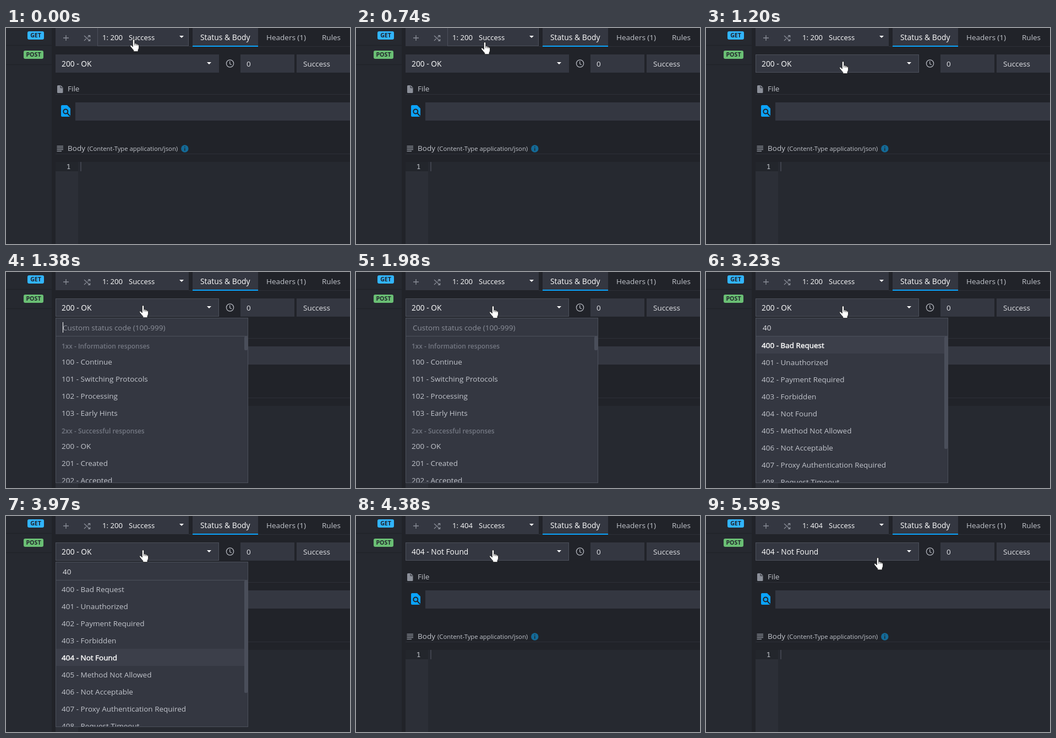
Animation of 625x392 px, one loop 6490 ms. Source, as an HTML page:

```html
<!DOCTYPE html>
<html lang="en">
<head>
<meta charset="utf-8">
<title>Status code picker</title>
<style>
  html, body { margin: 0; width: 100%; height: 100%; overflow: hidden; background: #212329; }
  svg { display: block; width: 100%; height: 100%; }
  text { font: 13.5px "Open Sans", "Noto Sans", sans-serif; fill: #c2c5cc; white-space: pre; }
  .bright { fill: #fff; }
  .value { fill: #e2e3e7; }
  .small { font-size: 11.3px; }
  .badge { font-size: 10.6px; font-weight: 700; fill: #20242b; text-anchor: middle; }
  .group { font-size: 11.9px; font-weight: 600; fill: #747883; }
  .code { font: 13px "Noto Sans Mono", "DejaVu Sans Mono", monospace; fill: #c9ccd2; }
  .field { fill: #343741; }
  .line { stroke: #2d3038; }
  .icon { fill: none; stroke: #8b8f99; stroke-width: 1.3; }
  .hover { fill: none; stroke: #4c505b; }
</style>
</head>
<body>
<svg viewBox="0 0 625 392" preserveAspectRatio="xMinYMin meet">
  <defs><clipPath id="listArea"><rect x="91" y="117" width="348" height="265"/></clipPath></defs>

  <rect width="625" height="392" fill="#212329"/>
  <rect width="83" height="392" fill="#262930"/>
  <path d="M0 31.5H83M0 66.5H83" stroke="#1f2127"/>
  <rect x="39" y="6" width="30" height="15" rx="3" fill="#31b4fb"/>
  <text class="badge" x="54" y="17.3">GET</text>
  <rect x="32" y="41" width="36" height="15" rx="3" fill="#6abf74"/>
  <text class="badge" x="50" y="52.3">POST</text>

  <path class="line" d="M332 33.5H625"/>
  <rect class="field" x="90" width="242" height="33"/>
  <path class="icon" d="M104 18H114M109 13V23"/>
  <path class="icon" d="M142 14L152 23M142 23L145.8 19.4M148.4 17L152 14M149 13.6H152.6V17M149 23.4H152.6V20"/>
  <text class="bright" x="175" y="22" style="font-size:13.2px" id="route"></text>
  <text class="bright" x="223" y="22" style="font-size:13px">Success</text>
  <path d="M315 14H323L319 18Z" fill="#fff"/>
  <rect class="hover" id="routeHover" x="166.5" y="-.5" width="165" height="33"/>

  <rect class="field" x="339" width="119" height="32"/>
  <rect x="339" y="32" width="119" height="2" fill="#0aa3fb"/>
  <text class="bright" x="353" y="22" style="font-size:13.9px">Status &amp; Body</text>
  <text x="473" y="22">Headers (1)</text>
  <text x="574" y="22">Rules</text>

  <rect class="field" x="90" y="48" width="297" height="33"/>
  <text class="bright" x="101" y="70" id="status" style="font-size:13.8px"></text>
  <path d="M365 62H373L369 66Z" fill="#fff"/>
  <rect class="hover" id="statusHover" x="90.5" y="48.5" width="296" height="32"/>
  <circle class="icon" cx="407" cy="64.5" r="6.6" style="stroke:#b3b6be"/>
  <path class="icon" d="M406.7 60.3V65L409.8 67" style="stroke:#b3b6be"/>
  <rect class="field" x="426" y="48" width="98" height="33"/>
  <text class="value" x="437" y="70">0</text>
  <rect class="field" x="528" y="48" width="97" height="33"/>
  <text class="value" x="540" y="70">Success</text>

  <path d="M93 105.5Q93 104 94.5 104H99.5L103.5 108V116.5Q103.5 118 102 118H94.5Q93 118 93 116.5Z" fill="#8b8f99"/>
  <path d="M99 104.8V108.5H102.8" fill="none" stroke="#212329"/>
  <text x="112" y="115">File</text>
  <path class="line" d="M90 120.5H625M90 228.5H625"/>
  <path d="M100 142Q100 140 102 140H111L117 146V159Q117 161 115 161H102Q100 161 100 159Z" fill="#0aa3fb"/>
  <circle cx="108.3" cy="151.5" r="4" fill="none" stroke="#212329" stroke-width="2"/>
  <path d="M111 154.3L116.5 160" stroke="#212329" stroke-width="2"/>
  <rect class="field" x="126" y="135" width="499" height="33"/>

  <path class="icon" d="M92.5 214.5H104M92.5 217.5H104M92.5 220.5H104M92.5 223.5H101"/>
  <text x="112" y="223">Body</text>
  <text class="small" x="148" y="223">(Content-Type application/json)</text>
  <circle cx="324.8" cy="219" r="6.7" fill="#146a97"/>
  <path d="M324.8 215V216.6M324.8 218V222.7" stroke="#212329" stroke-width="1.5"/>

  <rect x="90" y="243" width="535" height="149" fill="#262930"/>
  <rect x="90" y="243" width="41" height="149" fill="#2c2f37"/>
  <rect x="90" y="243" width="41" height="17" fill="#23262c"/>
  <text class="code" x="109.7" y="256">1</text>
  <path d="M136 243V260" stroke="#484d57" stroke-width="1.5"/>

  <g id="panel">
    <rect class="field" x="90.5" y="83.5" width="349" height="299" stroke="#4c505b"/>
    <path d="M91 116.5H439" stroke="#4c505b"/>
    <text x="103" y="106" id="query"></text>
    <rect id="caret" y="91" width="1" height="19" fill="#fff"/>
    <g id="list" clip-path="url(#listArea)"></g>
    <rect id="thumb" x="433" y="117" width="6" rx="2" fill="#4a4e5a"/>
  </g>

  <g id="hand" stroke="#111" stroke-width=".8" stroke-linejoin="round">
    <path fill="#fff" d="M5.3 14V2.3A1.7 1.7 0 0 1 8.7 2.3V8Q10.5 7.2 11.4 8.8Q13.2 8.2 14 9.8Q16.5 9.5 16.5 12V15.5Q16.5 17.5 15 20V22.7H6.8V20.5Q4.5 18 1 13.5Q0 11.5 1.6 11Q3 10.6 5.3 14Z"/>
    <path d="M8.7 8V11.5M11.4 8.8V11.8M14 9.8V12.2"/>
  </g>
</svg>

<script>
const LOOP = 6490;
const el = id => document.getElementById(id);
const between = (t, from, to) => t >= from && t < to;
const show = (id, on) => el(id).style.display = on ? '' : 'none';

const OPTIONS = [
  '1xx - Information responses', '100 - Continue', '101 - Switching Protocols',
  '102 - Processing', '103 - Early Hints',
  '2xx - Successful responses', '200 - OK', '201 - Created', '202 - Accepted',
  '204 - No Content', '304 - Not Modified',
  '400 - Bad Request', '401 - Unauthorized', '402 - Payment Required',
  '403 - Forbidden', '404 - Not Found', '405 - Method Not Allowed',
  '406 - Not Acceptable', '407 - Proxy Authentication Required',
  '408 - Request Timeout', '409 - Conflict'
];
const THUMB = { '': 25, '4': 49, '40': 204 };

// Keyboard selection: time and chosen option; each fades in over one short step.
const PICKS = [[3150, '400'], [3390, '401'], [3550, '402'], [3780, '403'], [3875, '404']];
const FADE = 80;

function pickWeights(t) {
  const now = PICKS.findLastIndex(([start]) => t >= start);
  if (now < 0) return {};
  const [start, code] = PICKS[now];
  if (t >= start + FADE) return { [code]: 1 };
  const weights = { [code]: 0.5 };
  if (now > 0) weights[PICKS[now - 1][1]] = 0.5;
  return weights;
}

// A thin outline emboldens text without changing its width.
const embolden = weight => `stroke:#fff;stroke-width:${0.45 * weight}px`;

function listMarkup(filter, weights) {
  let y = 117;
  return OPTIONS.filter(o => o.includes(filter)).map(option => {
    const top = y;
    if (option.includes('xx')) {
      y += 29.5;
      return `<text class="group" x="101" y="${top + 22}">${option}</text>`;
    }
    y += 31;
    const w = weights[option.slice(0, 3)] || 0;
    const rgb = [194, 197, 204].map(c => c + (255 - c) * w);
    return `<rect x="91" y="${top}" width="342" height="31" fill="#3c3f4a" opacity="${w}"/>
      <text x="101" y="${top + 21}" style="fill:rgb(${rgb});${w ? embolden(w) : ''}">${option}</text>`;
  }).join('');
}

function handPosition(t) {
  if (t < 600) return [225, 20];
  if (t < 1200) {
    const p = (Math.floor((t - 600) / 75) + 1) / 9;
    const eased = p * p * (3 - 2 * p);
    return [225 + 17 * eased, 20 + 40 * eased].map(Math.round);
  }
  if (t < 1660) return [242, 60];
  if (t < 5530) return [242, 61];
  return t < 5590 ? [282, 69] : [305, 75];
}

function queryStyle(query, t) {
  if (!query) return 'fill:#8c909a';
  return t < 3150 ? 'fill:#fff;' + embolden(1) : 'fill:#e2e3e7';
}

let lastList = '';
function render(t) {
  const code = t < 4380 ? '200' : '404';
  el('route').textContent = `1: ${code}`;
  el('status').textContent = OPTIONS.find(o => o.startsWith(code));

  const [x, y] = handPosition(t);
  el('hand').setAttribute('transform', `translate(${x} ${y})`);
  show('routeHover', y < 33);
  show('statusHover', y >= 47);

  show('panel', between(t, 1380, 4380));
  const query = t < 2320 ? '' : t < 2410 ? '4' : '40';
  el('query').textContent = query || 'Custom status code (100-999)';
  el('query').style.cssText = queryStyle(query, t);
  el('caret').setAttribute('x', 103 + 8 * query.length);
  show('caret', between(t, 1380, 1980) || between(t, 2320, 3000));

  const filter = t < 2410 ? '' : t < 2590 ? '4' : '40';
  el('thumb').setAttribute('height', THUMB[filter]);
  const markup = listMarkup(filter, pickWeights(t));
  if (markup !== lastList) el('list').innerHTML = lastList = markup;
}

const began = performance.now();
function tick() {
  render((performance.now() - began) % LOOP);
  requestAnimationFrame(tick);
}
tick();
</script>
</body>
</html>
```
